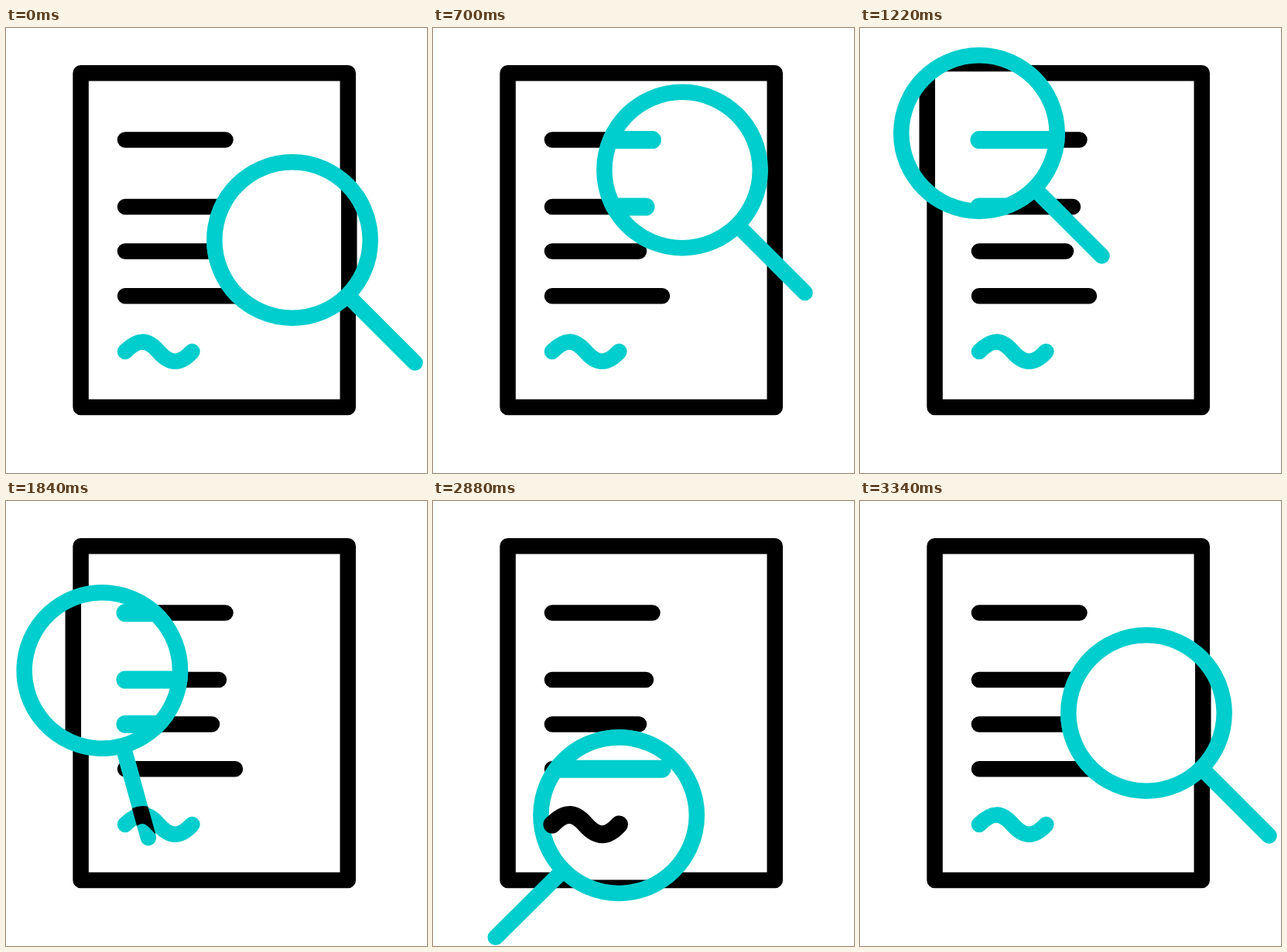
Animation of 544 by 575 pixels, one loop 3620 ms. Source, as an HTML page:

```html
<!DOCTYPE html>
<html lang="en">
<head>
<meta charset="utf-8">
<title>Document review</title>
<style>
  html, body { margin: 0; width: 100%; height: 100%; overflow: hidden; background: #fff; }
  svg { display: block; fill: none; stroke-width: 20.5; stroke-linecap: round; stroke-linejoin: round; }
</style>
</head>
<body>
<svg width="544" height="575" viewBox="0 0 544 575">
  <defs>
    <path id="lines" d="M154 144.6H283.5M154 231H275M154 288.4H266M154 346.2H296"/>
    <path id="sign" d="M154 418c16-16 28-17 43 0s28 17 43.5 0"/>
    <g id="glass">
      <circle r="100.7"/>
      <path d="M104 0H224.2"/>
    </g>
    <clipPath id="inner"><circle class="move" r="100.7"/></clipPath>
    <mask id="whole" maskUnits="userSpaceOnUse" x="0" y="0" width="544" height="575">
      <use class="move" href="#glass" fill="#fff" stroke="#fff"/>
    </mask>
  </defs>

  <rect x="96.6" y="58.3" width="345.2" height="431.6" stroke="#000"/>
  <use href="#lines" stroke="#000"/>
  <use href="#sign" stroke="#00cdcd"/>

  <!-- enlarged page seen through the lens -->
  <g clip-path="url(#inner)">
    <rect width="544" height="575" fill="#fff"/>
    <rect x="86.8" y="46" width="356.5" height="453.7" stroke="#000"/>
  </g>
  <use class="move" href="#glass" stroke="#00cdcd"/>
  <g mask="url(#whole)" stroke-width="23">
    <use href="#lines" stroke="#00cdcd"/>
    <use href="#sign" stroke="#000"/>
  </g>
</svg>
<script>
const LOOP = 3620, STEP = 20;
const REST = 45, TURNED = 137.8;

const easeIn = s => s * s * (2 - s);
const easeBoth = s => s * s * (3 - 2 * s);
const progress = (t, from, to) => Math.min(1, Math.max(0, (t - from) / (to - from)));

const makePath = d => {
  const path = document.createElementNS("http://www.w3.org/2000/svg", "path");
  path.setAttribute("d", d);
  return path;
};

const moves = [
  { from: 200, to: 1220, ease: easeIn, path: makePath("M370 274C380 186 196 89 154 136") },
  { from: 1508, to: 2420, ease: easeBoth, path: makePath("M154 136C115 182 101 262 197.5 412") },
  { from: 2716, to: 3340, ease: easeBoth, path: makePath("M197.5 412C216 418 410 372 370 274") }
];
const parts = document.querySelectorAll(".move");

function place(t) {
  const { from, to, ease, path } = moves.findLast(m => t >= m.from) || moves[0];
  return path.getPointAtLength(path.getTotalLength() * ease(progress(t, from, to)));
}

function angle(t) {
  const turn = easeBoth(progress(t, 1492, 2416)) - easeIn(progress(t, 2820, 3322));
  return REST + (TURNED - REST) * turn;
}

function draw(now) {
  const t = Math.floor((now % LOOP) / STEP) * STEP;
  const { x, y } = place(t);
  const pose = `translate(${x} ${y}) rotate(${angle(t)})`;
  parts.forEach(part => part.setAttribute("transform", pose));
}

let start;
function tick(now) {
  start ??= now;
  draw(now - start);
  requestAnimationFrame(tick);
}
draw(0);
requestAnimationFrame(tick);
</script>
</body>
</html>
```
